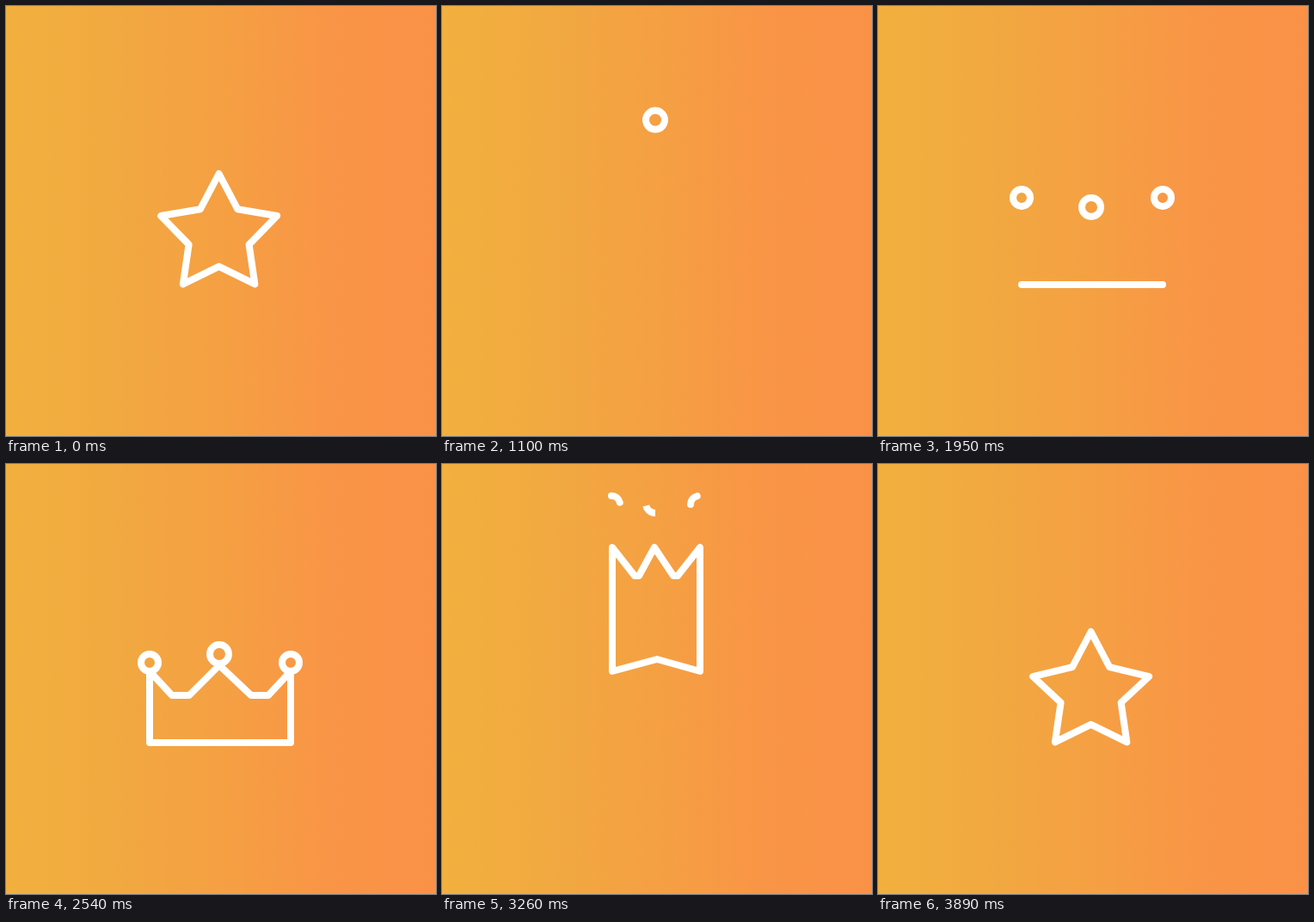
These frames come from a looping animation (500x500 px, 3.92 s). An HTML page with a canvas:

```html
<!DOCTYPE html>
<html lang="en">
<head>
<meta charset="utf-8">
<title>Star and crown</title>
<style>
  html, body { margin: 0; width: 100%; height: 100%; overflow: hidden; background: #f5a043; }
  canvas { display: block; width: 100vw; height: 100vh; }
</style>
</head>
<body>
<canvas id="stage" width="500" height="500"></canvas>
<script>
const LOOP = 3920;
const BASE = 324;
const AXIS = 249;
// Moments (ms) at which one phase hands over to the next.
const T = { spin: 180, tucked: 560, ball: 860, hit: 1290, land: 2070, press: 2870,
  jump: 2990, peak: 3260, touch: 3490 };

const ctx = document.getElementById('stage').getContext('2d');

const span = (t, a, b) => Math.min(1, Math.max(0, (t - a) / (b - a)));
const mix = (a, b, k) => a + (b - a) * k;
const rad = deg => deg * Math.PI / 180;
const easeIn = (u, n) => u ** n;
const easeOut = (u, n) => 1 - (1 - u) ** n;
const easeInOut = u => u < 0.5 ? 2 * u * u : 1 - 2 * (1 - u) ** 2;
const outBack = u => 1 + 2.7 * (u - 1) ** 3 + 1.7 * (u - 1) ** 2;

// Right half as [offset, y], completed by its reflection.
const mirror = (half, axis = AXIS) => [
  ...half.map(([x, y]) => [axis + x, y]),
  ...half.slice(1, -1).reverse().map(([x, y]) => [axis - x, y])
];
const blend = (a, b, k) => a.map((p, i) => p.map((v, j) => mix(v, b[i][j], k)));
const scale = (points, sx, sy) =>
  points.map(([x, y]) => [AXIS + (x - AXIS) * sx, BASE + (y - BASE) * sy]);

// Tucking shrinks the star and pulls its two legs together.
function starPoint(i, tuck = 0, shrink = 0) {
  const a = rad(i * 36), c = Math.cos(a);
  const angle = a - tuck * rad(12) * Math.sin(a) * c * Math.abs(c);
  const full = i % 2 ? 36.8 : 71;
  const small = (i % 2 ? 32.5 : 57.3) + 2 * c;
  const r = mix(mix(full, small, tuck), 11, shrink);
  return [r * Math.sin(angle), -r * Math.cos(angle)];
}

// Both outlines run: apex, valley (two points), peak, side, corner, notch.
const CROWN = mirror([[-1, 234], [36, 269], [56, 269], [82, 241], [82, 282], [82, BASE], [0, BASE]]);
const BANNER = mirror([[-2, 97], [20, 130], [25, 130], [51, 97], [51, 168], [51, 241], [1, 227]]);

function restingStar(droop = 0) {
  return mirror([0, 1, 1, 2, 3, 4, 5].map(i => {
    const [x, y] = starPoint(i);
    return [x, 266 + y + (i === 2 ? droop : 0)];
  }), 247.6);
}

const RINGS = [-1, 0, 1].map((side, i) => {
  const outer = Math.abs(side);
  return {
    x: 248 + 82 * side + outer, y: 221 + 10 * outer, r: 11 - outer,
    top: 182 + 21 * outer, drop: 1650 + 70 * outer,
    upX: 248 + 51 * side, upY: 46 + outer,
    from: [-90, 90, 180][i], cap: outer ? 'round' : 'butt'
  };
});

function poly(points, closed = true) {
  ctx.lineCap = 'round';
  ctx.beginPath();
  points.forEach(p => ctx.lineTo(...p));
  if (closed) ctx.closePath();
  ctx.stroke();
}

function ring(x, y, r, from = 0, share = 1, cap = 'butt') {
  if (share <= 0) return;
  ctx.lineCap = cap;
  ctx.beginPath();
  ctx.arc(x, y, r, rad(from), rad(from + 360 * share));
  ctx.stroke();
}

function burst(t, start, x, y, first, count) {
  const u = span(t, start, start + 340);
  if (u <= 0 || u >= 1) return;
  const head = mix(85, 137, easeOut(u, 3));
  const tail = mix(85, 137, easeInOut(u));
  for (let i = 0; i < count; i++) {
    const a = rad(first + i * 45);
    poly([tail, head].map(d => [x + d * Math.cos(a), y + d * Math.sin(a)]), false);
  }
}

function spinStar(t) {
  const x = 247.6 - 3.2 * Math.sin(Math.PI * span(t, T.spin, 940));
  const y = mix(266, 108, easeInOut(span(t, 230, T.ball)));
  const turn = rad(360 * easeInOut(span(t, 250, 900)));
  const tuck = easeIn(span(t, T.spin, T.tucked), 3);
  const shrink = easeOut(span(t, T.tucked, T.ball), 2);
  const c = Math.cos(turn), s = Math.sin(turn);
  poly(Array.from({ length: 10 }, (_, i) => {
    const [px, py] = starPoint(i, tuck, shrink);
    return [x + px * c - py * s, y + px * s + py * c];
  }));
}

function dropBall(t) {
  ring(248, mix(108, 323, easeIn(span(t, 923, T.hit), 3)), 11);
}

function bounce(t) {
  const half = 82 * easeOut(span(t, T.hit, 1950), 3);
  poly([[AXIS - half, BASE], [AXIS + half, BASE]], false);
  const rise = easeOut(span(t, T.hit, 1605), 3);
  const spread = easeOut(span(t, T.hit, 1470), 3);
  for (const c of RINGS) {
    const fall = easeIn(span(t, c.drop, c.drop + 420), 3);
    ring(mix(248, c.x, spread), mix(mix(323, c.top, rise), 323, fall), c.r);
  }
}

function trimRings(t, lift, sx = 1, sy = 1) {
  const share = 1 - span(t, 3080, 3310);
  for (const c of RINGS) {
    const x = AXIS + (c.x - AXIS) * sx;
    const y = 323 + (c.y - 323) * sy;
    ring(mix(x, c.upX, lift), mix(y, c.upY, lift), c.r, c.from, share, c.cap);
  }
}

function crown(t) {
  const press = easeInOut(span(t, T.press, T.jump));
  const sx = 1 + 0.05 * press;
  const sy = outBack(span(t, T.land, 2500)) * (1 - 0.16 * press);
  const lift = easeOut(span(t, T.jump, T.peak), 2);
  poly(blend(scale(CROWN, sx, sy), BANNER, lift));
  trimRings(t, lift, sx, sy);
  burst(t, T.land, 248, 257, 180, 5);
}

function landStar(t) {
  const droop = 16 * Math.exp(-Math.max(0, t - T.touch) / 240);
  poly(blend(BANNER, restingStar(droop), easeIn(span(t, T.peak, T.touch), 2)));
  trimRings(t, 1);
  burst(t, T.touch, 250, 244, 0, 8);
}

const PHASES = [
  [T.spin, () => poly(restingStar())],
  [T.ball, spinStar],
  [T.hit, dropBall],
  [T.land, bounce],
  [T.peak, crown],
  [LOOP, landStar]
];

const sky = ctx.createLinearGradient(0, 0, 500, 0);
['#f2b03e', '#f1a940', '#f5a043', '#f99546', '#fa9147']
  .forEach((color, i) => sky.addColorStop(i / 4, color));

function draw() {
  const t = performance.now() % LOOP;
  ctx.fillStyle = sky;
  ctx.fillRect(0, 0, 500, 500);
  ctx.strokeStyle = '#fff';
  ctx.lineWidth = 8;
  ctx.lineJoin = 'round';
  PHASES.find(([end]) => t < end)[1](t);
  requestAnimationFrame(draw);
}
draw();
</script>
</body>
</html>
```
